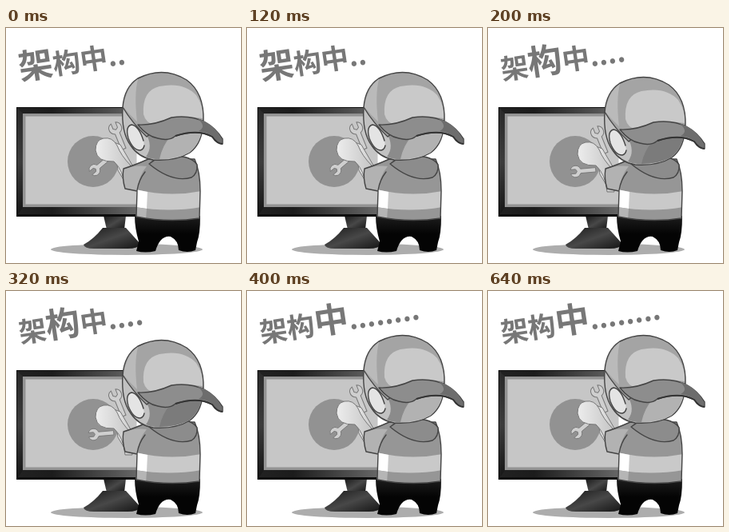
An HTML page for the animation above (0.8 s loop, 294 by 294 pixels).

```html
<!DOCTYPE html>
<html lang="zh">
<head>
<meta charset="utf-8">
<style>
  html, body { margin: 0; width: 100%; height: 100%; overflow: hidden; background: #fff; }
  svg { display: block; width: 100vw; height: 100vh; }
  text { font-family: "Noto Sans CJK SC", "Noto Sans CJK", sans-serif; font-weight: 700; font-size: 34.5px; fill: #777; }
  .big { font-size: 43px; }
  .line { stroke: #444; stroke-width: 1.4; stroke-linejoin: round; stroke-linecap: round; }
  .thin { stroke: #777; stroke-width: 1; stroke-linejoin: round; }
</style>
</head>
<body>
<svg viewBox="0 0 294 294">
  <defs>
    <linearGradient id="bezel">
      <stop stop-color="#222"/><stop offset=".3" stop-color="#1c1c1c"/><stop offset="1" stop-color="#666"/>
    </linearGradient>
    <linearGradient id="side" x2="0" y2="1">
      <stop stop-color="#2a2a2a"/><stop offset=".5" stop-color="#3c3c3c"/><stop offset="1" stop-color="#151515"/>
    </linearGradient>
    <linearGradient id="metal" x2="1" y2="1">
      <stop stop-color="#1a1a1a"/><stop offset=".5" stop-color="#484848"/><stop offset="1" stop-color="#141414"/>
    </linearGradient>
    <linearGradient id="skin" x2="1">
      <stop stop-color="#ededed"/><stop offset="1" stop-color="#c4c4c4"/>
    </linearGradient>
    <linearGradient id="pants" x2="0" y2="1">
      <stop stop-color="#1d1d1d"/><stop offset=".5" stop-color="#040404"/>
    </linearGradient>
    <path id="wrench" class="thin" fill="#cfcfcf" d="M-3 22 L-3 1 Q-9-2-8-8 Q-7-12-3-13 L-3-6 L0-4 L3-6 L3-13 Q8-11 8-6 Q8-1 3 1 L3 22Z"/>
    <path id="torso" d="M147 176 Q160 172 178 164 L236 164 Q243 180 243 204 L242 238 Q203 244 163 236 L164 204 L149 201 Q145 188 147 176Z"/>
    <clipPath id="torsoClip"><use href="#torso"/></clipPath>
  </defs>

  <text id="caption" transform="translate(17.900 64.900) rotate(-8.500)"></text>
  <ellipse cx="151" cy="277" rx="95" ry="7" fill="#adadad"/>

  <path fill="url(#metal)" d="M122 235 H150 L148 252 H126Z"/>
  <path fill="url(#metal)" d="M97 271 Q110 264 121 250 H150 L168 270 Q166 276 152 276 H110 Q98 276 97 271Z"/>
  <path fill="url(#bezel)" d="M13 99 H163 V236 H13Z"/>
  <path fill="url(#side)" d="M13 99 L22 108 V223 L13 236Z"/>
  <path d="M13.500 236 V99.500 H163" fill="none" stroke="#111"/>
  <path d="M14 234.500 H162" stroke="#0c0c0c" stroke-width="3"/>
  <rect x="21" y="107" width="142" height="117" fill="#939393"/>
  <rect x="24.500" y="110.500" width="139" height="110" fill="#c6c6c6"/>
  <circle cx="109" cy="167" r="32" fill="#929292"/>

  <g id="hands">
    <use href="#wrench" transform="translate(139 131) rotate(-22)"/>
    <path class="thin" fill="url(#skin)" d="M135 143 L143 146 L160 175 L152 198 L140 178Z"/>
    <use id="lowerWrench" href="#wrench"/>
    <path class="thin" fill="url(#skin)" d="M149 200 Q147 178 135 167 Q114 168 112 153 Q112 140 122 138 Q133 136 139 147 Q144 160 156 172 L158 200Z"/>
  </g>

  <path fill="url(#pants)" d="M161 235 Q202 243 243 235 Q243 258 239 268 L237 278 Q227 282 216 278 Q216 266 206 261 Q193 259 187 279 Q174 282 163 279 L166 267 Q161 250 161 235Z"/>
  <use href="#torso" fill="#969696"/>
  <g clip-path="url(#torsoClip)">
    <path fill="#c9c9c9" d="M162 202 Q205 212 244 204 V224 Q205 231 162 224Z"/>
    <path fill="#fff" d="M162 202 L177 205 L176 226 L162 224Z"/>
    <path fill="#b5b5b5" d="M162 224 L176 226 L175 240 H162Z"/>
    <path fill="#b2b2b2" d="M145 178 Q160 171 176 173 Q166 184 164 205 L145 201Z"/>
  </g>
  <use href="#torso" fill="none" class="line"/>
  <path class="line" fill="none" d="M164 203 Q166 190 174 180"/>
  <path class="line" fill="#8c8c8c" d="M179 170 Q190 160 209 160 Q232 160 239 171 Q240 182 232 187 Q208 194 179 170Z"/>

  <g id="head">
    <path class="line" fill="#c2c2c2" d="M146 99 Q144 131 156 147 Q166 162 184 165 Q212 167 230 156 Q247 143 246 116 L200 90Z"/>
    <path id="face" d="M176 135 L246 118 Q246 142 229 156 Q211 165 188 164 Q191 150 176 135Z"/>
    <path fill="#8b8b8b" d="M174 130 L206 136 Q196 146 192 164 Q183 165 175 161 Q185 148 174 130Z"/>
    <path class="line" fill="#e4e4e4" d="M172 141 Q166 122 157 121 Q149 123 153 138 Q159 153 168 153 Q172 152 173 147"/>
    <path class="line" fill="#a4a4a4" d="M146 99 Q148 74 165 63 Q197 47 226 65 Q248 81 247 116 Q206 108 176 136 Q158 119 146 99Z"/>
    <path fill="#bababa" d="M147 99 Q150 75 165 64 Q160 84 164 117 Q154 108 147 99Z"/>
    <path fill="#c9c9c9" d="M172 108 Q170 78 192 73 Q222 67 238 84 Q247 97 246 113 Q210 107 187 121 Q175 120 172 108Z"/>
    <path class="line" fill="#8d8d8d" d="M165 121 Q185 122 207 112 Q250 106 271 139 L271 145 Q264 145 258 136 Q240 126 212 135 Q204 142 190 138 Q177 136 165 121Z"/>
    <path fill="#6d6d6d" d="M239 113 Q260 119 270 139 V144 Q264 144 258 135 Q251 130 241 129 Q252 123 239 113Z"/>
    <path d="M212 135 Q240 126 258 136 Q264 145 271 145" fill="none" stroke="#333" stroke-width="2"/>
  </g>
</svg>
<script>
const byId = id => document.getElementById(id);
const CAPTION = [...'架构中'];

function draw(step) {
  const down = step === 1;
  const letters = CAPTION.map((char, i) => i === step ? `<tspan class="big">${char}</tspan>` : char);
  byId('caption').innerHTML = letters.join('') + '.'.repeat(2 ** (step + 1));
  byId('head').setAttribute('transform', `translate(0 ${down ? 6 : 0})`);
  byId('hands').setAttribute('transform', `translate(0 ${down ? 5 : 0})`);
  byId('lowerWrench').setAttribute('transform', `translate(115 174) rotate(${down ? -95 : -130}) scale(.9)`);
  byId('face').setAttribute('fill', down ? '#7b7b7b' : '#b2b2b2');
}

let shown = -1;
function tick(now) {
  const step = Math.min(2, Math.floor((now % 800) / 200));
  if (step !== shown) draw(shown = step);
  requestAnimationFrame(tick);
}
tick(performance.now());
</script>
</body>
</html>
```
